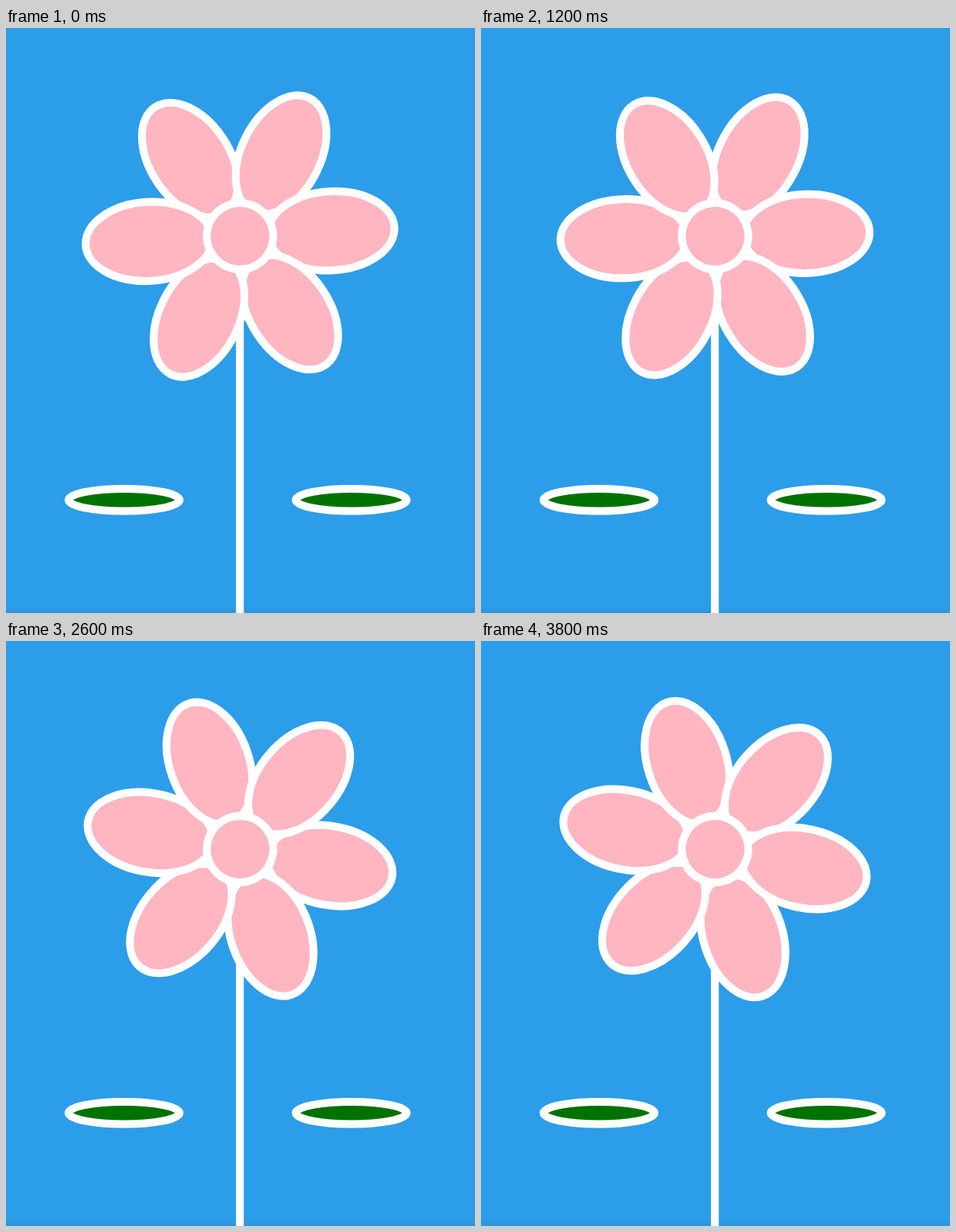
Write an HTML page that moves like this. It is 600 px wide and 749 px high and loops after 3.9 s.

```html
<!DOCTYPE html>
<html lang="en">
<head>
<meta charset="utf-8">
<title>Turning flower</title>
<style>
  html, body { margin: 0; width: 100%; height: 100%; overflow: hidden; background: #2c9de9; }
  svg { display: block; width: 600px; height: 749px; }
</style>
</head>
<body>
<svg viewBox="0 0 600 749">
  <defs>
    <linearGradient id="shade" x1="0" y1="0" x2="0" y2="1">
      <stop offset="0" stop-color="#2c9de9"/>
      <stop offset="1" stop-color="#2a95dc"/>
    </linearGradient>
  </defs>
  <rect width="600" height="749" fill="#2c9de9"/>
  <rect y="739" width="600" height="10" fill="url(#shade)"/>
  <g stroke="#fff" stroke-width="10">
    <path d="M299.2 267V749"/>
    <g fill="#007200">
      <ellipse cx="151" cy="604.3" rx="71" ry="14.3"/>
      <ellipse cx="441.7" cy="604.3" rx="71" ry="14.3"/>
    </g>
    <g id="flower" fill="#ffb6c1"></g>
  </g>
</svg>
<script>
  const NS = "http://www.w3.org/2000/svg";
  const LOOP = 3900, STEP = 100, TURN = 7000, START = -33.3;
  const PETALS = 6;
  const flower = document.getElementById("flower");

  function add(name, attrs) {
    const el = document.createElementNS(NS, name);
    for (const key in attrs) el.setAttribute(key, attrs[key]);
    flower.appendChild(el);
  }

  // Each petal overlaps the one before it, clockwise.
  for (let i = 0; i < PETALS; i++) {
    add("ellipse", {
      cy: -116.8, rx: 50.6, ry: 81,
      transform: `rotate(${i * 360 / PETALS})`
    });
  }
  add("circle", { r: 42.5 });

  function draw(ms) {
    const t = Math.floor((ms % LOOP) / STEP) * STEP;
    const angle = START + 360 * t / TURN;
    flower.setAttribute("transform", `translate(299.4 266.5) rotate(${angle})`);
  }

  let begin;
  function tick(now) {
    begin ??= now;
    draw(now - begin);
    requestAnimationFrame(tick);
  }
  draw(0);
  requestAnimationFrame(tick);
</script>
</body>
</html>
```
